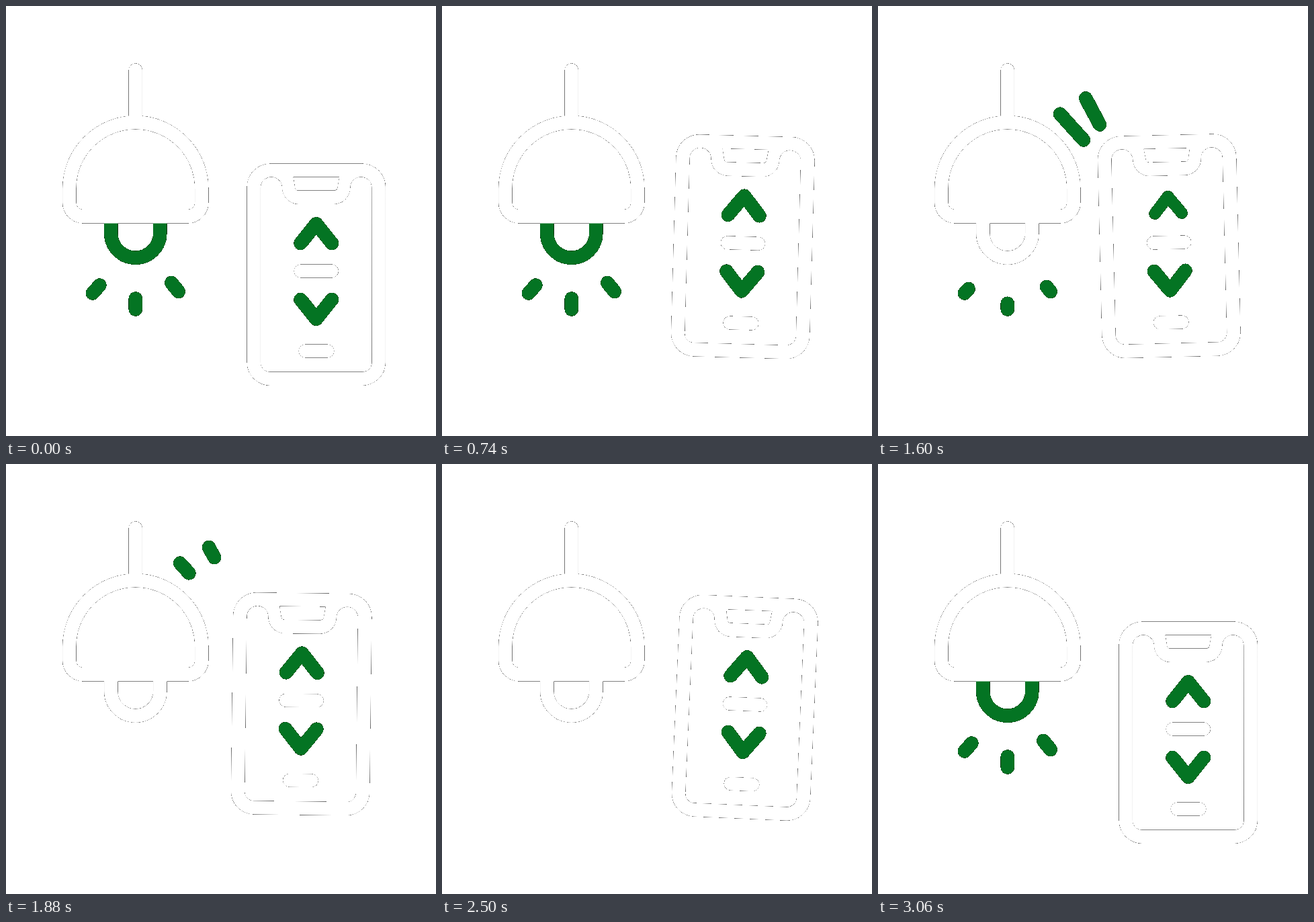
These frames come from a looping animation (640 by 640 pixels, 3080 ms). An HTML page with a canvas:

```html
<!DOCTYPE html>
<html lang="en">
<head>
<meta charset="utf-8">
<title>Lamp and phone</title>
<style>
html, body { margin: 0; width: 100%; height: 100%; overflow: hidden; background: #fff; }
canvas { display: block; width: 640px; height: 640px; }
</style>
</head>
<body>
<canvas id="stage" width="640" height="640"></canvas>
<script>
const SIZE = 640, LOOP = 3080, GREEN = '#047423', W = 20.4, CUTOFF = 96;
const stage = document.getElementById('stage').getContext('2d');
const layer = document.createElement('canvas');
layer.width = layer.height = SIZE;
const ctx = layer.getContext('2d', { willReadFrequently: true });

// Keyframes as [time, value]
const tilt = [[0, 0], [400, -5], [900, 3.7], [1200, 3.7], [1650, -1.55], [2160, 3.7], [3060, 0]];
const moveX = [[0, 0], [360, -20.7], [540, -17.5], [740, -14], [900, -13], [1200, -13],
  [1650, -29], [2160, -13], [2260, -13], [2500, -11], [3060, 0]];
const moveY = [[0, 0], [300, -18], [540, -34], [740, -41.5], [900, -42.5], [2260, -42.5],
  [2500, -37], [2800, -16.5], [3060, 0]];
const press = [[1350, 1], [1580, 0.86], [1640, 0.86], [1880, 1]];
const rayLength = [[1400, 1], [1830, 0], [2820, 0], [3040, 1]];
const sparkHead = [[1400, 0], [1700, 1]];
const sparkTail = [[1700, 0], [1980, 1]];

// Monotone cubic interpolation through keyframes, flat at both ends
function slope(keys, i) {
  if (i === 0 || i === keys.length - 1) return 0;
  const rate = k => (keys[k + 1][1] - keys[k][1]) / (keys[k + 1][0] - keys[k][0]);
  const a = rate(i - 1), b = rate(i);
  return a * b <= 0 ? 0 : 2 * a * b / (a + b);
}

function at(keys, t) {
  const last = keys.length - 1;
  if (t <= keys[0][0]) return keys[0][1];
  if (t >= keys[last][0]) return keys[last][1];
  let i = 0;
  while (t >= keys[i + 1][0]) i++;
  const [t0, v0] = keys[i], [t1, v1] = keys[i + 1];
  const d = t1 - t0, u = (t - t0) / d, s = u * u * (3 - 2 * u);
  return v0 + (v1 - v0) * s
    + d * u * (1 - u) * ((1 - u) * slope(keys, i) - u * slope(keys, i + 1));
}

function stroke(color, width, points) {
  ctx.strokeStyle = color;
  ctx.lineWidth = width;
  ctx.lineCap = ctx.lineJoin = 'round';
  ctx.beginPath();
  points.forEach(([x, y]) => ctx.lineTo(x, y));
  ctx.stroke();
}

// Part of a segment between the fractions a and b
function segment([x0, y0, x1, y1], a, b) {
  if (b - a < 0.002) return;
  const mix = k => [x0 + (x1 - x0) * k, y0 + (y1 - y0) * k];
  stroke(GREEN, W, [mix(a), mix(b)]);
}

function bulb(color) {
  ctx.strokeStyle = color;
  ctx.lineWidth = W;
  ctx.lineCap = 'butt';
  ctx.beginPath();
  ctx.moveTo(156.25, 323);
  ctx.arc(192.75, 338.2, 36.5, Math.PI, 0, true);
  ctx.lineTo(229.25, 323);
  ctx.stroke();
}

function lamp() {
  stroke('#fff', W, [[192.75, 95.5], [192.75, 172]]);
  ctx.beginPath();
  ctx.arc(192.75, 271.75, 98.5, Math.PI, 0);
  ctx.arcTo(291.25, 313.25, 192, 313.25, 20.7);
  ctx.arcTo(94.25, 313.25, 94.25, 271, 20.7);
  ctx.closePath();
  ctx.stroke();
}

function phoneBody() {
  const P = Math.PI, bump = 15.95;
  ctx.fillStyle = '#fff';
  ctx.beginPath();
  ctx.roundRect(358.55, 234.55, 206.4, 330.4, 34.5);
  // Screen with its notch
  ctx.moveTo(378.95, 270.4);
  ctx.arc(394.9, 270.4, bump, P, 0);
  ctx.arc(435.4, 270.4, 24.55, P, P / 2, true);
  ctx.arc(487.9, 270.4, 24.55, P / 2, 0, true);
  ctx.arc(528.4, 270.4, bump, P, 0);
  ctx.arcTo(544.55, 544.55, 460, 544.55, 14);
  ctx.arcTo(378.95, 544.55, 378.95, 400, 14);
  ctx.closePath();
  // Speaker
  ctx.moveTo(427.6, 254.45);
  ctx.lineTo(496, 254.45);
  ctx.arcTo(492.6, 274.55, 461, 274.55, 5);
  ctx.arcTo(431, 274.55, 427.6, 254.45, 5);
  ctx.closePath();
  ctx.fill('evenodd');
  stroke('#fff', 20, [[438.5, 394.5], [485, 394.5]]);
  stroke('#fff', 20, [[445.5, 513.5], [478.5, 513.5]]);
}

function chevron(y, dir, scale) {
  ctx.save();
  ctx.translate(461.75, y);
  ctx.scale(scale, scale);
  stroke(GREEN, W, [[-23.3, 14.5 * dir], [0, -14.5 * dir], [23.3, 14.5 * dir]]);
  ctx.restore();
}

function phone(t) {
  ctx.save();
  ctx.translate(461.75 + at(moveX, t), 399.75 + at(moveY, t));
  ctx.rotate(at(tilt, t) * Math.PI / 180);
  ctx.translate(-461.75, -399.75);
  phoneBody();
  chevron(338.6, 1, at(press, t));
  chevron(451.4, -1, 1);
  ctx.restore();
}

// Partly covered pixels darken towards black, faint ones stay white
function paintEdges() {
  const img = ctx.getImageData(0, 0, SIZE, SIZE), d = img.data;
  for (let i = 0; i < d.length; i += 4) {
    const a = d[i + 3];
    for (let k = i; k < i + 3; k++) d[k] = a < CUTOFF ? 255 : d[k] * a / 255;
    d[i + 3] = 255;
  }
  stage.putImageData(img, 0, 0);
}

function render(t) {
  const lit = t < 1500 || t >= 2900;
  ctx.clearRect(0, 0, SIZE, SIZE);
  bulb(lit ? GREEN : '#fff');
  lamp();

  const len = at(rayLength, t);
  segment([128.8, 427.5, 139.5, 415.5], 0, len);
  segment([192.75, 451.5, 192.75, 435.5], 0, len);
  segment([256.8, 425, 246.2, 412], 0, len);

  const head = at(sparkHead, t), tail = at(sparkTail, t);
  segment([306, 199.5, 259, 147.5], tail, head);
  segment([330, 176.5, 302, 124], tail, head);

  phone(t);
  paintEdges();
}

function tick(now) {
  render(now % LOOP);
  requestAnimationFrame(tick);
}
render(0);
requestAnimationFrame(tick);
</script>
</body>
</html>
```
